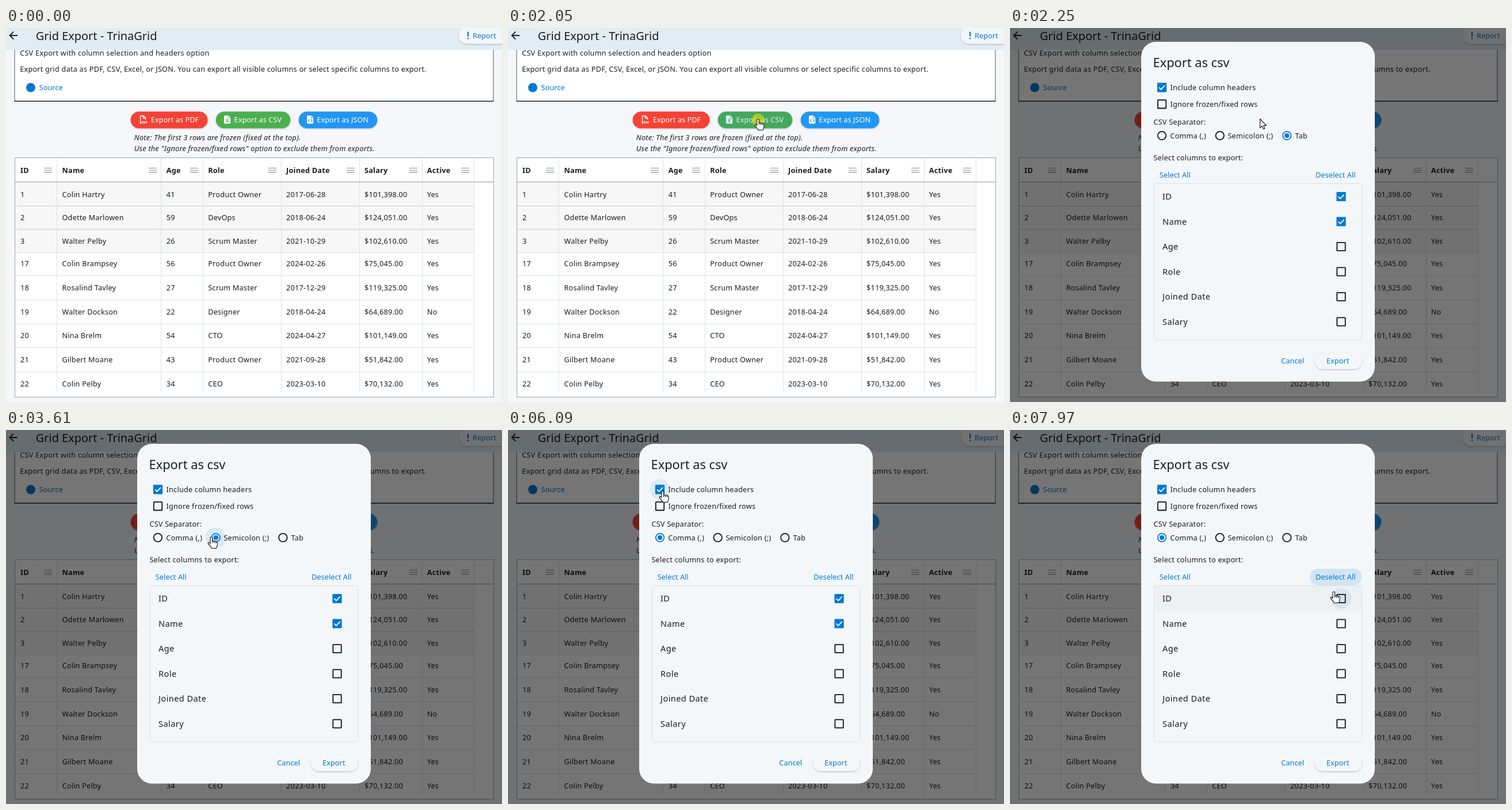
An HTML page for the animation above (8 s loop, 862 px wide and 650 px high).

```html
<!DOCTYPE html>
<html lang="en">
<head>
<meta charset="utf-8">
<title>Grid Export</title>
<style>
html, body { margin: 0; width: 100%; height: 100%; overflow: hidden; background: #f5f7fa; }
svg { display: block; }
text { font-family: "Noto Sans", "Open Sans", sans-serif; white-space: pre; }
</style>
</head>
<body>
<svg id="stage" width="862" height="650" viewBox="0 0 862 650">
  <defs>
    <filter id="shadow" x="-10%" y="-20%" width="120%" height="160%">
      <feDropShadow dx="0" dy="1" stdDeviation="1" flood-opacity=".28"/>
    </filter>
  </defs>
  <g id="page"></g>
  <g id="hovers"></g>
  <rect id="barrier" width="862" height="650"/>
  <g id="dialog"><g id="panel"></g><g id="controls"></g></g>
  <g id="pointer"></g>
</svg>
<script>
const INK = '#1a1c1e', BLUE = '#0078d4', SURFACE = '#f4f7fa';
const $ = id => document.getElementById(id);

// Text is placed by its left edge and the middle of its capitals.
const text = (x, mid, str, { size = 12.68, gap = .227, fill = INK, weight = 400, style = 'normal' } = {}) =>
  `<text x="${x}" y="${mid + size * .357}" font-size="${size}" letter-spacing="${gap}" fill="${fill}" font-weight="${weight}" font-style="${style}">${str}</text>`;
const label = (x, mid, str, fill = BLUE) => text(x, mid, str, { fill, gap: .09, weight: 500 });
const rect = (x, y, x2, y2, fill, more = '') =>
  `<rect x="${x}" y="${y}" width="${x2 - x}" height="${y2 - y}" fill="${fill}" ${more}/>`;
const line = (d, stroke, width = 1, more = '') =>
  `<path d="${d}" fill="none" stroke="${stroke}" stroke-width="${width}" ${more}/>`;
const disc = (x, y, r, fill, more = '') => `<circle cx="${x}" cy="${y}" r="${r}" fill="${fill}" ${more}/>`;

// ---- page ----
const buttons = [
  [216.7, 350.5, '#f44336', 'Export as PDF', 251.8],
  [364.7, 494.3, '#4caf50', 'Export as CSV', 396.5],
  [508.7, 645.3, '#2196f3', 'Export as JSON', 540.3]
];
const pill = ([x, x2], fill, more = '') => rect(x, 145.3, x2, 174.3, fill, `rx="14.5" ${more}`);

const fileIcon = (x, color, glyph) =>
  `<path d="M${x} 153.4q0-1.4 1.4-1.4h6l3.8 3.8v9q0 1.4-1.4 1.4h-8.4q-1.4 0-1.4-1.4z" fill="#fff"/>` +
  line(`M${x + 6.9} 152.8v3.6h3.6`, color, .9) + line(glyph, color, 1.2);

const edges = [15.9, 88.4, 269.6, 342.1, 478, 613.9, 722.6, 813.2];
const heads = ['ID', 'Name', 'Age', 'Role', 'Joined Date', 'Salary', 'Active'];
const rows = `1|Colin Hartry|41|Product Owner|2017-06-28|$101,398.00|Yes
2|Odette Marlowen|59|DevOps|2018-06-24|$124,051.00|Yes
3|Walter Pelby|26|Scrum Master|2021-10-29|$102,610.00|Yes
17|Colin Brampsey|56|Product Owner|2024-02-26|$75,045.00|Yes
18|Rosalind Tavley|27|Scrum Master|2017-12-29|$119,325.00|Yes
19|Walter Dockson|22|Designer|2018-04-24|$64,689.00|No
20|Nina Brelm|54|CTO|2024-04-27|$101,149.00|Yes
21|Gilbert Moane|43|Product Owner|2021-09-28|$51,842.00|Yes
22|Colin Pelby|34|CEO|2023-03-10|$70,132.00|Yes`.split('\n').map(r => r.split('|'));

function drawGrid() {
  let s = rect(15.5, 225.5, 847.5, 641.5, '#fff', 'stroke="#a1a5ae"') +
    rect(16, 268, 813, 390, '#f7f7f7');
  rows.forEach((row, i) => {
    const frozen = i < 3;
    const mid = frozen ? 289 + 40.8 * i : 409.9 + 41.67 * (i - 3);
    const bottom = frozen ? [309, 349.5, 390][i] : Math.round(430.3 + 41.67 * (i - 3));
    if (i < 8) s += line(`M16 ${bottom + .5}H813`, i < 2 ? '#c6c8cb' : '#dde2eb');
    row.forEach((cell, c) => s += text(edges[c] + 9.1, mid, cell));
  });
  heads.forEach((head, c) => {
    const right = Math.round(edges[c + 1]);
    s += text(edges[c] + 9.1, 247.3, head, { weight: 600 }) +
      line(`M${right + .5 - (c === 1)} 226V632`, '#dde2eb') +
      line(`M${right - 22} 243.5h14m-14 3.7h14m-14 3.7h14`, '#8b8d90', 1.1);
  });
  return s + line('M16 267.7H847', '#a9abae', 1.2);
}

function drawPage() {
  const note = { style: 'italic' };
  return rect(0, 0, 862, 650, '#f5f7fa') +
    rect(15, 20, 847, 127, '#fff') +
    line('M15 30V127M847 30V127', '#55585b') + line('M14.5 127.3H847.5', '#1c1c1c', 1.4) +
    text(24.2, 43.5, 'CSV Export with column selection and headers option') +
    text(24.2, 71, 'Export grid data as PDF, CSV, Excel, or JSON. You can export all visible columns or select specific columns to export.') +
    disc(43, 103.5, 8, BLUE) + label(57.6, 103.3, 'Source') +
    rect(0, 0, 862, 38, '#e1ecf4') +
    line('M20 13H7M13.2 6.3L6.6 13l6.6 6.7', INK, 1.9) +
    text(51.8, 14, 'Grid Export - TrinaGrid', { size: 19.94, gap: 0 }) +
    rect(787, -1.5, 890, 27.5, SURFACE, 'rx="14.5" filter="url(#shadow)"') +
    line('M803 6.5v8.2M803 17v2.6', BLUE, 2.2) + label(811, 13.3, 'Report') +
    buttons.map(b => pill(b, b[2], 'filter="url(#shadow)"') + label(b[4], 159.8, b[3], '#fff')).join('') +
    line('M233.5 160.5v-7q0-1 1-1h4.500l3.500 3.500v3.500M238.500 152.800v3.700h3.700M233.500 160.500v5h2', '#fff', 1.4) +
    text(235.2, 164.3, 'PDF', { size: 5.6, gap: 0, fill: '#fff', weight: 700 }) +
    fileIcon(379, '#4caf50', 'M382.3 158l4.6 6m0-6l-4.6 6') +
    fileIcon(523, '#2196f3', 'M527.4 158.5l-2 2.300 2 2.300m2.600-4.600l2 2.300-2 2.300') +
    text(222.8, 190.5, 'Note: The first 3 rows are frozen (fixed at the top).', note) +
    text(222.8, 209, 'Use the "Ignore frozen/fixed rows" option to exclude them from exports.', note) +
    drawGrid();
}

// ---- dialog ----
const fields = ['ID', 'Name', 'Age', 'Role', 'Joined Date', 'Salary'];
const fieldY = i => 293 + 43.5 * i;

function drawPanel() {
  return rect(228, 24, 634, 614.5, SURFACE, 'rx="25.4"') +
    text(248.6, 60.7, 'Export as csv', { size: 21.75, gap: 0 }) +
    text(278.5, 103.3, 'Include column headers') +
    text(278.5, 132.3, 'Ignore frozen/fixed rows') +
    text(249.4, 163.3, 'CSV Separator:') +
    text(278.2, 187, 'Comma (,)') + text(378.4, 187, 'Semicolon (;)') + text(495.5, 187, 'Tab') +
    text(249.4, 225, 'Select columns to export:') +
    rect(250.5, 270.5, 612, 542, 'none', 'rx="3.6" stroke="#dcdfe3"') +
    fields.map((f, i) => text(265, fieldY(i) + .3, f, { size: 14.5, gap: .45 })).join('') +
    label(471.2, 578.5, 'Cancel') +
    rect(529.3, 563.7, 612, 593, SURFACE, 'rx="14.6" filter="url(#shadow)"') +
    label(550, 578.5, 'Export');
}

const check = (x, y, on) => on
  ? rect(x - 8.1, y - 8.1, x + 8.1, y + 8.1, BLUE, 'rx="1"') + line(`M${x - 5} ${y}l3.400 3.600 6.600-7`, '#fff', 1.8)
  : rect(x - 7.2, y - 7.2, x + 7.2, y + 7.2, 'none', 'rx=".6" stroke="#111" stroke-width="1.8"');
const radio = (x, y, on) =>
  disc(x, y, 7.2, 'none', `stroke="${on ? BLUE : '#111'}" stroke-width="1.8"`) + (on ? disc(x, y, 4.1, BLUE) : '');

// ---- motion: time, x, y of the pointer tip ----
const path = [
  [250, 590, 8], [560, 575, 166], [800, 440, 168], [1020, 300, 160], [1090, 300, 160],
  [1350, 330, 84], [1850, 434.5, 158], [2520, 434.5, 158], [3150, 366, 186], [3500, 366, 186],
  [4100, 265, 186], [4300, 265, 186], [4850, 271.5, 143.5], [4990, 270, 140.5], [5800, 270, 140.5],
  [6060, 268.7, 106], [6700, 268.7, 106], [7410, 583, 251], [7700, 580, 251], [7970, 562.7, 281]
];
const clicks = [1920, 3340, 4170, 5060, 5600, 6400, 6640, 7550];
const within = (t, a, b) => t >= a && t < b;

function pointerAt(t) {
  const i = path.findIndex(p => p[0] > t);
  if (i < 0) return path[path.length - 1].slice(1);
  const [t0, x0, y0] = path[i - 1], [t1, x1, y1] = path[i];
  const u = (t - t0) / (t1 - t0), k = u * u * (3 - 2 * u);
  return [x0 + (x1 - x0) * k, y0 + (y1 - y0) * k];
}

const ARROW = 'M0 0V15.600L3.600 12.300 6 17.800 8.400 16.800 6.100 11.400H10.900Z';
const HAND = 'M-1.800 1.800A1.800 1.800 0 0 1 1.800 1.800V7.500A1.600 1.600 0 0 1 4.700 8A1.600 1.600 0 0 1 7.700 8.700A1.500 1.500 0 0 1 10.400 9.800V13.500C10.400 16.500 9 17 8.600 19.500H.4C-.5 17-3.800 14-5.400 11.400C-6.200 9.800-4.400 8.800-3.300 9.800L-1.800 11.400ZM1.800 7.500V10.500M4.700 8.500V10.700M7.700 9V11';

function render(t) {
  const shown = t >= 250, open = t >= 2110;
  const [x, y] = shown ? pointerAt(t) : [-99, -99];
  let hand = false;

  const over = open ? [] : buttons.filter(b => x > b[0] && x < b[1] && y > 145 && y < 174);
  $('hovers').innerHTML = over.map(b => pill(b, BLUE, 'opacity=".1"')).join('');
  hand = over.length > 0;

  const fade = t < 2110 ? [0, 0] : t < 2180 ? [.3, .35] : t < 2250 ? [.85, .85] : [1, 1];
  $('barrier').setAttribute('opacity', .54 * fade[0]);
  $('dialog').setAttribute('opacity', fade[1]);

  const picked = t < 3340 ? 2 : t < 4170 ? 1 : 0;
  const include = !within(t, 6400, 6640), ignore = within(t, 5060, 5600);
  const radios = [264, 364.7, 481.3];
  let s = '';
  const halo = (cx, cy, blue) => {
    if (!open || Math.hypot(x - cx, y - cy) > 18) return;
    hand = true;
    s += disc(cx, cy, 17.8, blue ? BLUE : '#000', `opacity="${blue ? .1 : .08}"`);
  };
  // Only the nearer of the two stacked check boxes reacts.
  y < 118 ? halo(264, 103.3, include) : halo(264, 132.3, ignore);
  radios.forEach((rx, i) => halo(rx, 187, i === picked));
  if (open && x > 251 && x < 611 && y > 271) {
    hand = true;
    s += rect(251, 271, 611.5, 314.8, '#000', 'opacity=".025"');
  }
  halo(575.5, fieldY(0), true);
  if (t >= 7480) s += rect(521, 241, 611.7, 270, BLUE, 'rx="14.5" opacity=".14"');
  if (open && x > 521 && x < 612 && y > 241 && y < 271) hand = true;

  s += label(259.8, 255.6, 'Select All') + label(531, 255.6, 'Deselect All') +
    check(264, 103.3, include) + check(264, 132.3, ignore) +
    radios.map((rx, i) => radio(rx, 187, i === picked)).join('') +
    fields.map((f, i) => check(575.5, fieldY(i), i < 2 && t < 7550)).join('');
  $('controls').innerHTML = s;

  const click = clicks.find(c => within(t, c, c + 190));
  $('pointer').innerHTML = !shown ? '' :
    (click ? disc(x, y + 2, Math.min(11, 7 + (t - click) / 20), '#f0e000', 'opacity=".6"') : '') +
    `<path transform="translate(${x} ${y})" d="${hand ? HAND : ARROW}" fill="#fff" stroke="#111" stroke-width="1.1" stroke-linejoin="round"/>`;
}

$('page').innerHTML = drawPage();
$('panel').innerHTML = drawPanel();
const start = performance.now();
function tick() {
  render((performance.now() - start) % 8000);
  requestAnimationFrame(tick);
}
tick();
</script>
</body>
</html>
```
